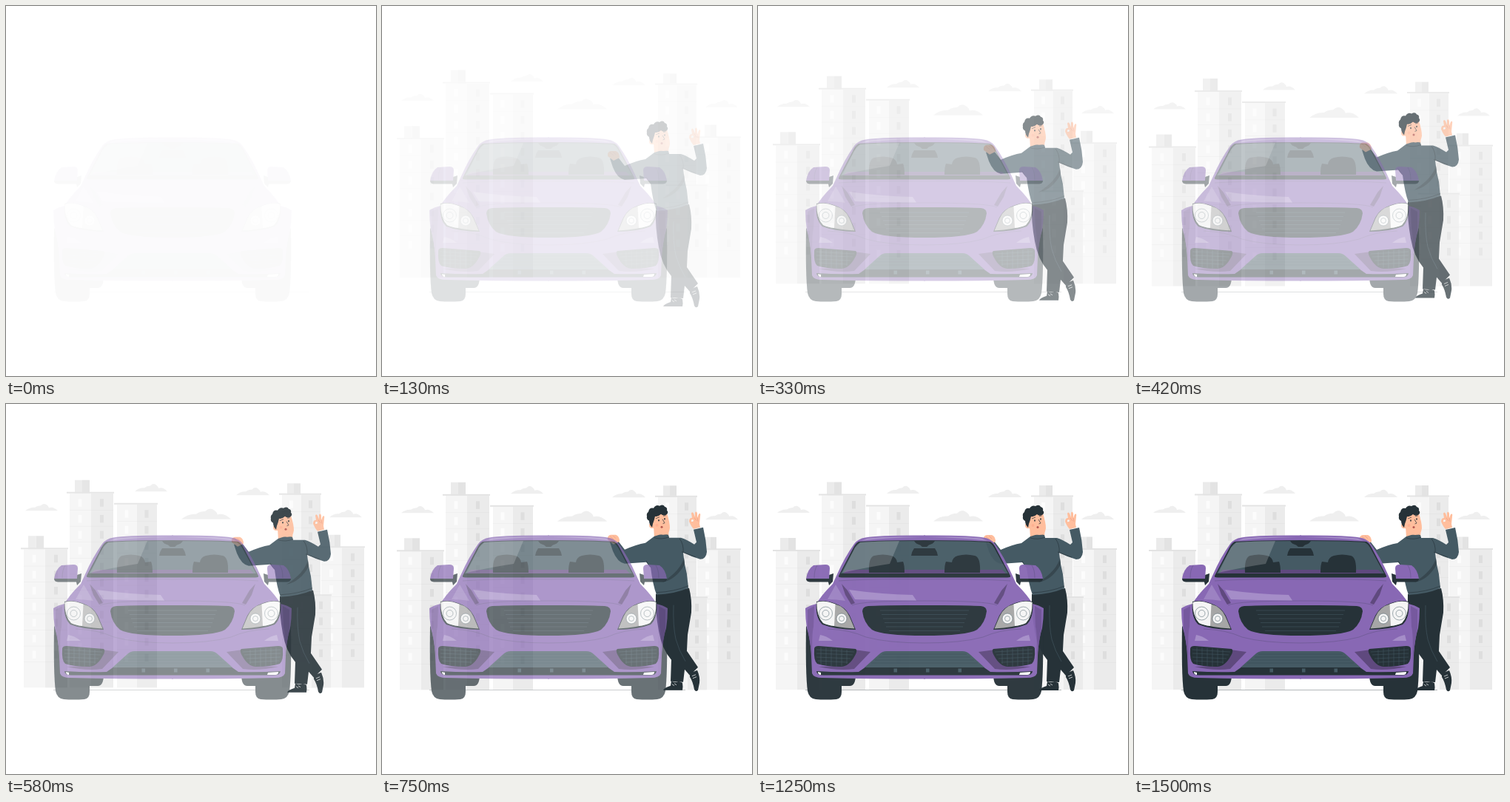
An HTML page that plays this animation: 500x500 px, repeating every 1620 ms.

```html
<!DOCTYPE html>
<html lang="en">
<head>
<meta charset="utf-8">
<title>Car and driver</title>
<style>
html, body { margin: 0; width: 100%; height: 100%; overflow: hidden; background: #fff; }
svg { display: block; width: 100vw; height: 100vh; }
.ink { fill: #263238; }
.slate { fill: #455a64; }
.skin { fill: #ffbe9d; }
.paint { fill: #8868b4; }
.shade { fill: #5f497e; }
.shine { fill: #a58dc8; }
.thin { fill: none; stroke: #263238; stroke-width: .5; }
.mesh { fill: none; stroke: #455a64; stroke-width: .5; }
</style>
</head>
<body>
<svg viewBox="0 0 500 500" xmlns="http://www.w3.org/2000/svg">
  <g id="city"></g>

  <g id="man">
    <!-- legs and shoes -->
    <path class="ink" d="M391 375 Q397 377 401 375 L406 377 Q407 383 406 387 H380 Q381 384 390 381Z"/>
    <path class="ink" d="M416 364 L426 360 Q430 369 429 377 L427 387 Q424 390 422 386 Q420 375 416 369Z"/>
    <path d="M392 379 l3 2 M395 378 l3 2 M419 368 l5 -2 M420 371 l5 -2" fill="none" stroke="#fff" stroke-width=".7"/>
    <path class="ink" d="M370 257 L415 249 Q419 264 418 282 L413 312 L412 334 L427 356 L416 367 L409 359 L407 376 L390 375 L391 346 Q378 331 374 307 Q369 280 370 257Z"/>
    <path d="M394 272 Q393 300 397 318 Q401 333 410 348" fill="none" stroke="#455a64" stroke-width=".6"/>
    <!-- neck and torso -->
    <path class="skin" d="M367 165 L388 166 L387 181 H368Z"/>
    <path class="slate" d="M368 179 Q378 175 387 177 L388 181 L404 181 Q411 183 422 190 L425 187 L421 170 L434 167 Q438 184 439 200 Q438 210 430 210 Q419 207 407 201 Q408 215 412 230 L414 249 Q395 257 371 258 Q366 245 363 221 L357 214 L328 216 Q318 214 312 199 L308 187 L318 184 L328 197 Q344 190 356 188Z"/>
    <path d="M368 181 Q378 184 388 180 M402 182 Q408 190 407 201 M363 221 Q359 217 357 212 M405 200 L424 207 M371 255 Q395 254 414 246" fill="none" stroke="#263238" stroke-width=".6"/>
    <path d="M408 208 Q404 225 379 241 Q397 238 409 217Z" fill="#37474f"/>
    <!-- hands -->
    <path class="skin" d="M305 184 Q304 178 309 177 L316 177 Q321 179 321 186 L313 190Z"/>
    <path d="M308 179 l5 4 M312 178 l4 4" fill="none" stroke="#e58f78" stroke-width=".5"/>
    <path class="skin" d="M421 169 Q418 166 415 159 Q415 154 419 154 L418 148 Q419 145 421 148 L423 153 L423 147 Q425 144 426 148 L426 154 L428 149 Q431 147 430 152 L429 162 L430 167Z"/>
    <path d="M418 157 Q421 155 421 158 Q420 160 418 159Z" fill="#f5f5f5"/>
    <path d="M422 154 L425 158 M426 154 L427 159" fill="none" stroke="#e58f78" stroke-width=".5"/>
    <!-- head -->
    <path class="skin" d="M365 150 Q375 143 385 148 Q389 160 389 168 Q388 177 380 177 Q371 176 367 168 Q361 169 361 164 Q361 161 365 161Z"/>
    <path class="ink" d="M366 162 L365 167 Q361 163 361 158 Q357 156 358 152 Q357 148 360 146 Q361 140 367 141 Q370 136 375 138 Q380 135 382 139 Q386 140 385 144 Q388 147 384 150 Q380 152 377 149 Q373 153 369 152 Q368 157 366 162Z"/>
    <path d="M370 155 l5 -2 M380 151.500 l3.500 -.5 M379 156 L382 161 L379.500 162" fill="none" stroke="#263238" stroke-width=".7"/>
    <ellipse class="ink" cx="374" cy="157.500" rx=".8" ry="1.200"/>
    <ellipse class="ink" cx="382" cy="155.500" rx=".8" ry="1.200"/>
    <circle cx="371.500" cy="164" r="2" fill="#f99d82" opacity=".4"/>
    <ellipse cx="378" cy="166.500" rx="1.500" ry="1.500" fill="#b5574f"/>
  </g>

  <g id="car">
    <path d="M64 386.500 H410" stroke="#263238" stroke-width=".35"/>
    <g id="half">
      <!-- tyre -->
      <path class="ink" d="M112 365 H132 Q132 381 124 381 H112Z"/>
      <path class="ink" d="M65 300 L113 350 V389 Q113 398 106 399 Q91 400 78 399 Q69 398 67 388 Q64 365 65 300Z"/>
      <!-- shell -->
      <path class="paint" d="M226 177.500 Q165 177 145 180.500 Q135 182 130 189 Q117 207 107 230 L101 243 Q85 259 79 270 Q70 272 64 276 Q64 290 66 303 Q71 318 72 340 L73 364 Q75 370 87 370 Q150 371.500 226 371.500Z"/>
      <path d="M67 278 L76 273 L75 301 Q72 312 74 350 Q71 325 67 303Z" fill="#76599e"/>
      <path class="shine" d="M148 181.500 Q175 178.500 220 180 Q170 180.500 140 185Z"/>
      <!-- mirror -->
      <path class="ink" d="M65 236 L95 235 L96 231 L102 229 L101 240 L96 245 L95 240.500 L70 240.500 Q65 240 65 236Z"/>
      <path class="paint" d="M65 236 Q67 223 75 218 L91 217 Q97 217 97 222 L96 236Z"/>
      <path class="thin" opacity=".4" d="M76 235 Q76 224 80 218"/>
      <!-- windscreen -->
      <path class="ink" d="M226 184 Q165 184 136 186 Q132 188 129 194 L109 232 Q108 234.500 113 234.500 H226Z"/>
      <path class="slate" d="M226 185 Q165 185 138 187 Q134 189 131 194 L112 229 H226Z"/>
      <path class="shade" d="M120 224 H226 V229 H115Z"/>
      <path class="ink" d="M150 228 Q149 207 157 205 Q169 202 180 205 Q187 207 188 214 L196 213 Q198 217 198 228Z"/>
      <path class="ink" d="M226 185 H211 Q213 189 219 190.500 L222 193 H226Z M226 195 H211 Q208 199 207 205 H226Z"/>
      <!-- hood -->
      <path class="shade" d="M113 243 L121 252 L131 269 L126 271 L118 258Z"/>
      <path class="thin" opacity=".4" d="M226 237 Q150 236 109 239 M127 272 Q140 266 226 266 M94 304 Q124 305 146 315 Q175 323 226 323"/>
      <!-- headlight -->
      <path class="ink" d="M79 267 Q90 264 104 269.500 Q118 274 124 286 L132 305 Q105 305 87 298 Q77 289 79 267Z"/>
      <path d="M79.500 268 Q90 264.500 103 270 Q118 274 123.500 287 L130.500 303.500 Q104 302 88 296 Q79 286 79.500 268Z" fill="#a6a6a6"/>
      <path d="M79.500 268 Q90 264.500 104.500 270.500 L103 300 Q94 299 88 296 Q79 286 79.500 268Z" fill="#f5f5f5"/>
      <g fill="#f5f5f5" stroke="#455a64" stroke-width=".5">
        <circle cx="91.500" cy="283" r="9"/><circle cx="91.500" cy="283" r="4.500"/>
        <circle cx="113" cy="290" r="7"/><circle cx="113" cy="290" r="3.500"/>
      </g>
      <!-- bumper -->
      <path class="shine" d="M84 312 Q92 313 101 320 L82 320Z"/>
      <path class="shade" d="M130 332 L152 335 L130 358 Q108 361 82 355 L112 354Z"/>
      <path class="ink" d="M76 331 Q76 327 82 327 L132 331 Q135 333 131 340 Q123 355 112 355 Q92 355 80 351 Q75 347 76 331Z"/>
      <path class="mesh" d="M79 332 L130 335 M79 337 L128 339 M79 342 L125 344 M81 347 L121 349 M85 329 v23 M92 329 v24 M99 330 v24 M106 330 v25 M113 331 v23 M120 332 v19"/>
      <path class="ink" d="M79 361 Q110 363 136 362 L146 355 H226 V366.500 H90 Q79 367 79 361Z"/>
      <path class="slate" d="M226 334 H174 Q168 334 164 338 L144 356 H226Z"/>
      <path class="mesh" style="stroke:#263238" stroke-opacity=".5" d="M226 338 H168 M226 342 H163 M226 346 H158 M226 350 H153"/>
      <!-- radiator grille -->
      <path class="ink" d="M226 272 Q170 271.500 149 273 Q141 274 141 280 Q143 296 154 305 Q168 313 226 313Z"/>
      <path class="mesh" d="M226 279 H165 M226 284.500 H167 M226 290 H169 M226 295.500 H171 M226 301 H173 M226 306.500 H177"/>
    </g>
    <use href="#half" transform="matrix(-1 0 0 1 450 0)"/>
    <path d="M138 187 Q160 185 191 185 L178 216 Q150 220 114 228 L131 194Z" fill="#fff" opacity=".19"/>
    <path class="shine" d="M123 251 Q165 257 209 258 L214 265.500 Q165 265 131 264Z"/>
    <path class="shine" opacity=".7" d="M105 244 L118 266 Q106 264 94 264Z"/>
    <path d="M183.500 357.500h4.500v5h-4.500z M227 357.500h4.500v5h-4.500z M270.500 357.500h4.500v5h-4.500z" fill="#455a64"/>
    <path d="M81 362 L85 363 V366 Q81 366 81 362Z M354 363 L368 362 Q368 366 364 366 H353Z" fill="#fff"/>
  </g>
</svg>

<script>
const LOOP = 1620, HOLD = 80, FADE = 1500, SLIDE = 1100, SHIFT = 24;
const el = id => document.getElementById(id);
const city = el('city'), man = el('man'), car = el('car');

const rect = (x, y, w, h, fill) =>
  `<rect x="${x}" y="${y}" width="${w}" height="${h}" fill="${fill}"/>`;

// Two-faced tower: left edge, fold, right edge, roof height, optional chimney
function tower(x, mid, end, top, chimney) {
  const base = 386;
  let s = '';
  if (chimney) {
    const [a, b, y] = chimney, m = (a + b) / 2;
    s += rect(a, y, m - a, top - y, '#ebebeb') + rect(m, y, b - m, top - y, '#e3e3e3');
  }
  s += rect(x, top, mid - x, base - top, '#f5f5f5') + rect(mid, top, end - mid, base - top, '#ebebeb');
  s += rect(x - 4, top - 2, end - x + 5, 2, '#e3e3e3');
  for (let y = top + 7.5; y < base - 40; y += 21.6) {
    s += rect((x + mid) / 2 - 3, y, 5, 10.5, '#fcfcfc') + rect((mid + end) / 2 - 3, y, 5, 10.5, '#dedede');
    s += rect(x, y + 15, mid - x, .6, '#ebebeb') + rect(mid, y + 15, end - mid, .6, '#e3e3e3');
  }
  return s;
}

function cloud(x, y, w, h) {
  return `<path transform="translate(${x} ${y}) scale(${w / 44} ${h / 11})" fill="#efefef"
    d="M0 10 Q6 5 13 5.500 Q16 3 21 3 Q25 -1 29 2 Q32 4 32 6 Q38 4 44 10Z"/>`;
}

city.innerHTML =
  cloud(26, 137, 44, 11) + cloud(174, 110, 44, 12) + cloud(237, 143, 67, 17) +
  cloud(311, 115, 45, 12) + cloud(437, 145, 44, 12) +
  tower(86, 115, 145, 123.5, [93, 113, 105.5]) +
  tower(24, 53, 83, 199, [30, 51, 181]) +
  tower(150, 177, 204, 138.5) +
  tower(373, 399, 425, 125.5, [380, 398, 110]) +
  tower(426, 454, 484, 197, [436, 452, 179.5]) +
  tower(388, 413, 439, 262);

function bezier(x1, y1, x2, y2) {
  const at = (a, b, s) => 3 * a * s * (1 - s) ** 2 + 3 * b * s * s * (1 - s) + s ** 3;
  return x => {
    if (x <= 0) return 0;
    if (x >= 1) return 1;
    let lo = 0, hi = 1;
    for (let i = 0; i < 24; i++) {
      const m = (lo + hi) / 2;
      if (at(x1, x2, m) < x) lo = m; else hi = m;
    }
    return at(y1, y2, lo);
  };
}
const fade = bezier(0, 0, .58, 1);
const slide = bezier(.3, .5, .55, 1.25);

function place(node, p, dir) {
  node.setAttribute('transform', `translate(0 ${(dir * SHIFT * (1 - p)).toFixed(2)})`);
  node.setAttribute('opacity', Math.min(1, p).toFixed(3));
}

function draw(t) {
  const p = t < HOLD ? 0 : slide(t / SLIDE);
  place(city, p, -1);
  place(man, p, 1);
  car.setAttribute('opacity', fade((t < HOLD ? 20 : t) / FADE).toFixed(3));
}

const start = performance.now();
function tick() {
  draw((performance.now() - start) % LOOP);
  requestAnimationFrame(tick);
}
draw(0);
requestAnimationFrame(tick);
</script>
</body>
</html>
```
